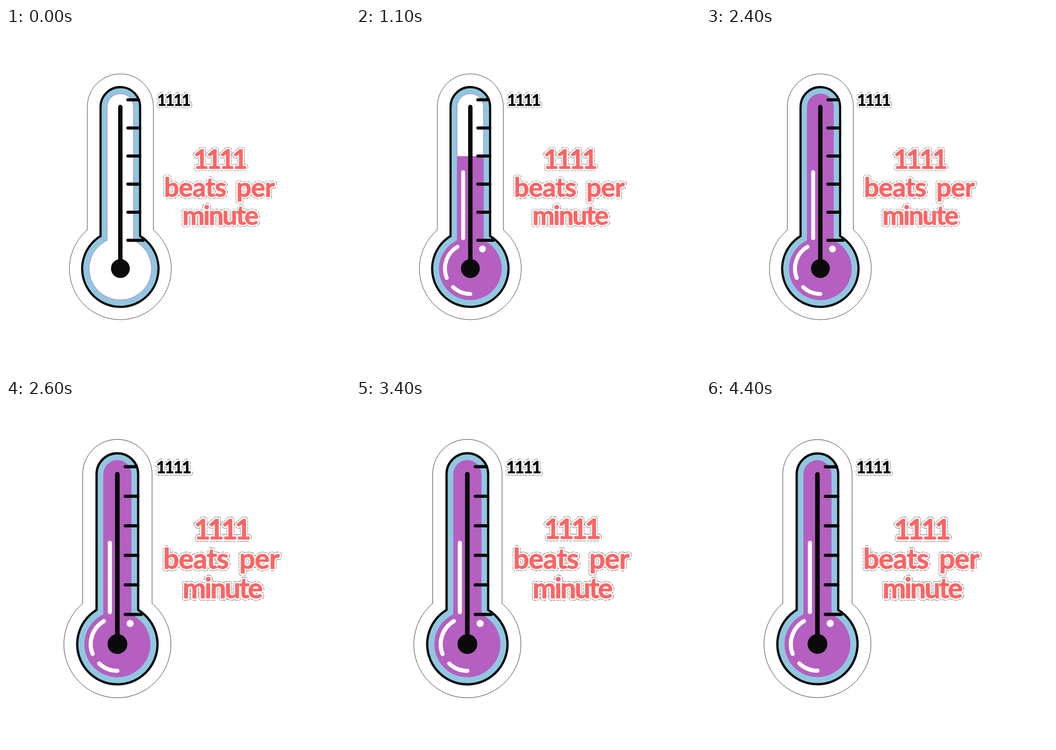
An HTML page for the animation above (4500 ms loop, 748 by 748 pixels).

```html
<!DOCTYPE html>
<html lang="en">
<head>
<meta charset="utf-8">
<title>Thermometer</title>
<style>
  html, body { margin: 0; width: 100%; height: 100%; overflow: hidden; background: #fff; }
  svg { display: block; width: 100vw; height: 100vh; }
  path, line { fill: none; stroke-linecap: round; stroke-linejoin: round; }
  text { font: 700 58px Lato, "Open Sans", sans-serif; letter-spacing: -1px; text-anchor: middle; }
  .tight { letter-spacing: -3px; }
  .count { font-size: 58px; letter-spacing: -5.5px; }
  .mark { font-size: 35px; letter-spacing: -2.6px; }
  .words { stroke-linejoin: round; }
  .rim { fill: #222; stroke: #222; stroke-width: 9px; stroke-dasharray: 5 1.5; }
  .halo { fill: #fff; stroke: #fff; stroke-width: 7.8px; }
  .coral { fill: #ff6464; stroke: #ff6464; stroke-width: .9px; }
  .ink { fill: #0a0a0a; stroke: #0a0a0a; stroke-width: .8px; }
  #sticker { fill: #fff; stroke: #222; stroke-width: .9px; }
  #glass { fill: #90c7e0; stroke: #0a0a0a; stroke-width: 4.8px; }
  #bore { fill: #fff; stroke: #b55fc1; stroke-width: .9px; }
  #fluid { fill: #b55fc1; }
  .shine { stroke: #fff; stroke-width: 8.5px; }
  .black { stroke: #0a0a0a; }
</style>
</head>
<body>
<svg viewBox="0 0 748 748">
  <defs>
    <clipPath id="level"><rect id="fill" x="150" y="591" width="200" height="460"/></clipPath>
    <g id="message">
      <text class="count" x="463.5" y="306">1111</text>
      <text x="411" y="367">beats</text>
      <text x="542" y="367">per</text>
      <text class="tight" x="465" y="428">minute</text>
    </g>
    <text id="top" class="mark" x="364" y="169.2">1111</text>
  </defs>
  <g id="scene">
    <path id="sticker"/>
    <path id="glass"/>
    <path id="bore"/>
    <g clip-path="url(#level)">
      <path id="fluid"/>
      <line class="shine" x1="233" y1="313.5" x2="233" y2="457"/>
      <path class="shine" d="M220.8 475.6A55 55 0 0 0 197.4 543.5M211 563.2A55 55 0 0 0 248.7 578.3"/>
      <circle cx="275" cy="480.5" r="7.4" fill="#fff"/>
    </g>
    <line class="black" stroke-width="9.6" x1="248.6" y1="171.8" x2="248.6" y2="523"/>
    <circle cx="248.7" cy="523" r="20.5" fill="#0a0a0a"/>
    <path id="ticks" class="black" stroke-width="6.8"/>
    <g class="words">
      <g class="rim"><use href="#message"/><use href="#top"/></g>
      <g class="halo"><use href="#message"/><use href="#top"/></g>
      <use class="coral" href="#message"/>
      <use class="ink" href="#top"/>
    </g>
  </g>
</svg>
<script>
  const LOOP = 4500, STEP = 100;
  const FILL_TIME = 2450, LOW = 591.5, HIGH = 142.5;
  const POP_START = 2420, POP_HALF = 295, POP_GAIN = 0.05, DAMPING = 0.308;
  const CX = 248.6, CAP_Y = 171.5, BULB_Y = 523.4;
  const el = id => document.getElementById(id);

  // Round-topped tube of half width h joined to a bulb of radius r.
  function body(h, r) {
    const neck = BULB_Y - Math.sqrt(r * r - h * h);
    const left = CX - h, right = CX + h;
    return `M${left} ${neck}V${CAP_Y}A${h} ${h} 0 0 1 ${right} ${CAP_Y}` +
      `V${neck}A${r} ${r} 0 1 1 ${left} ${neck}Z`;
  }

  el('sticker').setAttribute('d', body(71.8, 110.8));
  el('glass').setAttribute('d', body(43, 83));
  el('bore').setAttribute('d', body(28.6, 67.8));
  el('fluid').setAttribute('d', body(28.8, 68));

  const tickEnds = [288, 291, 291, 291, 291, 298];
  el('ticks').setAttribute('d',
    tickEnds.map((end, i) => `M265 ${156.2 + i * 61.1}H${end}`).join(''));

  function level(t) {
    const rest = 1 - Math.min(t / FILL_TIME, 1);
    return LOW + (HIGH - LOW) * (1 - rest * rest);
  }

  // Underdamped spring settling at 1 + POP_GAIN.
  function scale(t) {
    if (t < POP_START) return 1;
    const a = Math.PI * (t - POP_START) / POP_HALF;
    const swing = Math.exp(-DAMPING * a) * (Math.cos(a) + DAMPING * Math.sin(a));
    return 1 + POP_GAIN * (1 - swing);
  }

  const start = performance.now();
  function draw(now) {
    const elapsed = Math.max(0, now - start) % LOOP;
    const t = Math.floor(elapsed / STEP) * STEP;
    el('fill').setAttribute('y', level(t));
    el('scene').setAttribute('transform',
      `translate(374 374) scale(${scale(t)}) translate(-374 -374)`);
    requestAnimationFrame(draw);
  }
  draw(start);
</script>
</body>
</html>
```
